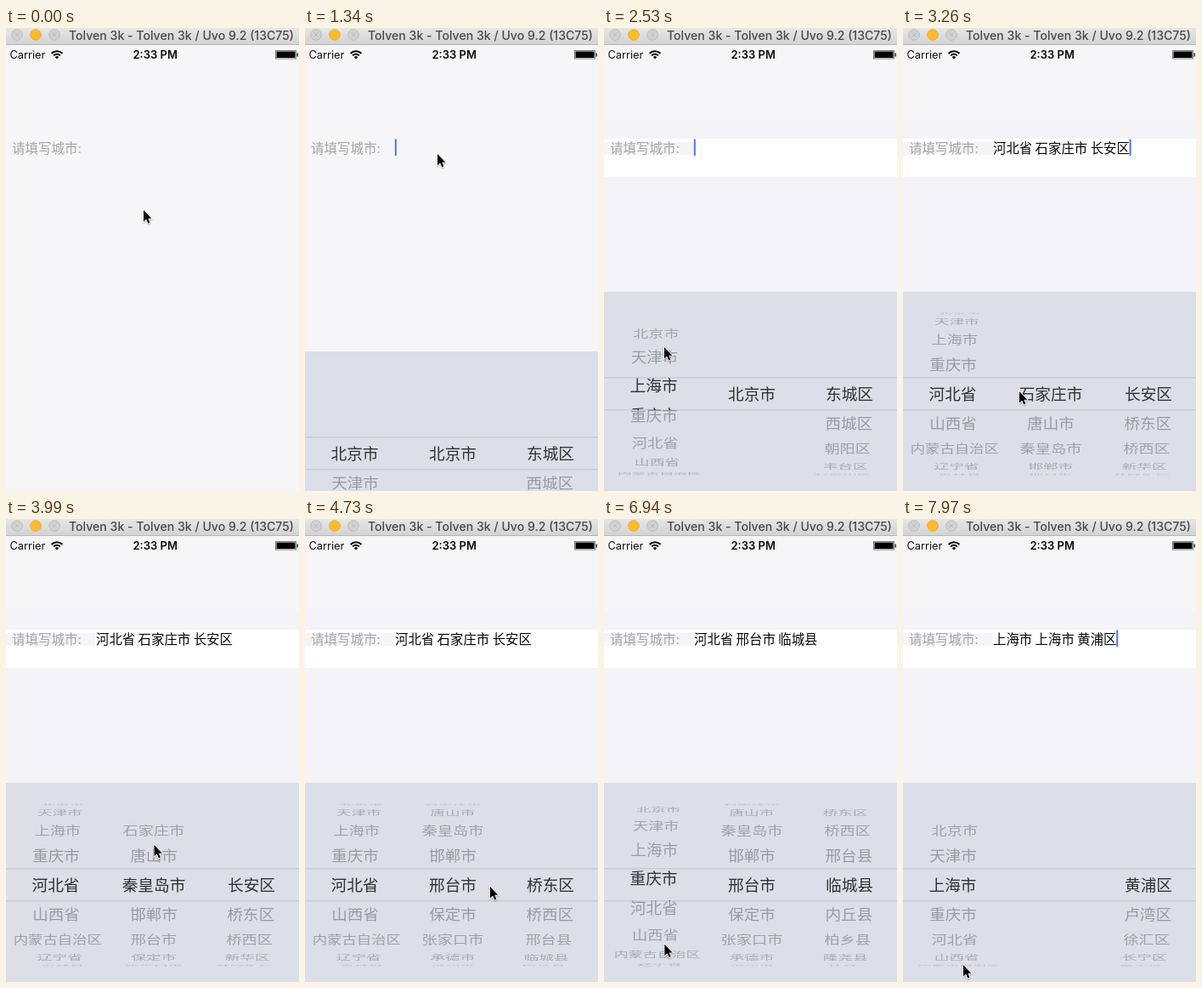
Write an HTML page with a canvas that moves like this. It is 345 by 544 pixels and loops after 8 s.

```html
<!DOCTYPE html>
<html lang="zh-CN">
<head>
<meta charset="utf-8">
<title>City picker</title>
<style>
  html, body { margin: 0; width: 100%; height: 100%; overflow: hidden; background: #f6f6f8; }
  canvas { display: block; width: 345px; height: 544px; }
</style>
</head>
<body>
<canvas id="stage"></canvas>
<script>
const W = 345, H = 544, LOOP = 8000, STEP = 147.59;
const CJK = '"Noto Sans CJK SC", "Noto Sans CJK", sans-serif';
const LATIN = 'Inter, Roboto, sans-serif';
const canvas = document.getElementById('stage');
const dpr = window.devicePixelRatio || 1;
canvas.width = W * dpr;
canvas.height = H * dpr;
const ctx = canvas.getContext('2d');

const list = s => s.split(' ');
const provinces = list('北京市 天津市 上海市 重庆市 河北省 山西省 内蒙古自治区 辽宁省 吉林省 黑龙江省 江苏省');
const hebei = list('石家庄市 唐山市 秦皇岛市 邯郸市 邢台市 保定市 张家口市 承德市 沧州市 廊坊市 衡水市');
const beijing = list('东城区 西城区 朝阳区 丰台区 石景山区 海淀区');
const shijiazhuang = list('长安区 桥东区 桥西区 新华区 井陉矿区 裕华区');
const xingtai = list('桥东区 桥西区 邢台县 临城县 内丘县 柏乡县 隆尧县 任县 南和县');
const shanghai = list('黄浦区 卢湾区 徐汇区 长宁区 静安区 普陀区');

// Lists and text jump, the rest eases.
const OPEN = 9, RESET = 51;
const lists = [[0, ['北京市'], beijing], [20, hebei, shijiazhuang], [30, hebei, xingtai], [RESET, [], shanghai]];
const edits = [[OPEN, ''], [21, '河北省 石家庄市 长安区'], [36, '河北省 邢台市 桥东区'],
  [43, '河北省 邢台市 临城县'], [53, '上海市 上海市 黄浦区']];
const latest = (track, n) => track.filter(k => k[0] <= n).pop();

function ease(n, from, to) {
  const p = Math.min(1, Math.max(0, (n - from) / (to - from)));
  return p * p * (3 - 2 * p);
}

// Pointer moves: start, end, x, y
const moves = [
  [0, 2, 190, 200], [2, 5, 156, 148],
  [9, 14, 72, 455], [14, 17, 71, 375],
  [18, 22, 137, 427], [22, 24, 172, 480], [24, 28, 175, 365],
  [29, 32, 218, 432], [32, 35, 285, 470], [35, 39, 285, 371],
  [40, 44, 72, 455], [44, 49, 71, 524]
];

function pointerAt(n) {
  let x = 162, y = 214;
  for (const [from, to, tx, ty] of moves) {
    const p = ease(n, from, to);
    x += (tx - x) * p;
    y += (ty - y) * p;
  }
  return [x, y];
}

function rect(color, x, y, w, h) {
  ctx.fillStyle = color;
  ctx.fillRect(x, y, w, h);
}

function text(str, x, y, font, color, align = 'left') {
  ctx.font = font;
  ctx.fillStyle = color;
  ctx.textAlign = align;
  ctx.fillText(str, x, y);
}

function button(x, fill, edge, crossed) {
  ctx.beginPath();
  ctx.arc(x, 8, 6.3, 0, 7);
  ctx.fillStyle = fill;
  ctx.fill();
  if (crossed) {
    for (const d of [-2.5, 2.5]) {
      ctx.moveTo(x - 2.5, 8 - d);
      ctx.lineTo(x + 2.5, 8 + d);
    }
  }
  ctx.strokeStyle = edge;
  ctx.lineWidth = 1;
  ctx.stroke();
}

function drawBars() {
  const bar = ctx.createLinearGradient(0, 0, 0, 19);
  bar.addColorStop(0, '#e6e6e6');
  bar.addColorStop(1, '#d3d3d3');
  rect(bar, 0, 0, W, 19);
  rect('#b7b7b7', 0, 19, W, 1);
  button(13, '#d2d2d2', '#bababa', true);
  button(35, '#fdbb2d', '#f0ae2b', false);
  button(57, '#d2d2d2', '#bababa', true);
  text('Tolven 3k - Tolven 3k / Uvo 9.2 (13C75)', 74, 13.5, '500 14.1px ' + LATIN, '#484848');

  text('Carrier', 4.5, 36, '12.8px ' + LATIN, '#111');
  text('2:33 PM', 175.7, 36, '600 13px ' + LATIN, '#0a0a0a', 'center');

  ctx.strokeStyle = ctx.fillStyle = '#0a0a0a';
  ctx.lineWidth = 2;
  for (const r of [5.3, 8.8]) {
    ctx.beginPath();
    ctx.arc(60, 36, r, -Math.PI * .76, -Math.PI * .24);
    ctx.stroke();
  }
  ctx.beginPath();
  ctx.moveTo(60, 36.5);
  ctx.arc(60, 36.5, 3.2, -Math.PI * .75, -Math.PI * .25);
  ctx.fill();

  ctx.lineWidth = 1;
  ctx.strokeStyle = '#808080';
  ctx.strokeRect(317.5, 26.5, 24, 9.5);
  rect('#000', 318.5, 27.5, 22, 7.5);
  rect('#333', 342.5, 29.5, 1.5, 4);
}

function drawField(n) {
  if (n > OPEN) {
    rect('#f3f3f8', 0, 108, W, 202);
    rect('#fff', 0, 130, W, 45);
    rect('#f5f5f8', 0, 134, 105, 15);
  }
  text('请填写城市:', 7, 147, '300 15.5px ' + CJK, '#a6a6a8');
  if (n < OPEN) return;
  const [since, value] = latest(edits, n);
  text(value, 106, 147, '15.4px ' + CJK, '#080808');
  const blinkOn = (n - since) % 7 < 4;
  if (blinkOn) rect('#4a78ea', 105.8 + ctx.measureText(value).width, 130.5, 2, 19.5);
}

// Rows sit on a cylinder seen from the front.
function drawWheel(rows, pos, cx, dark) {
  ctx.font = '18.7px ' + CJK;
  ctx.textAlign = 'center';
  rows.forEach((row, i) => {
    const angle = (i - pos) * .372;
    if (Math.abs(angle) > 1.53) return;
    const c = Math.cos(angle), far = 1 - c;
    const fit = Math.min(1, 107 / ctx.measureText(row).width);
    ctx.save();
    ctx.translate(172.5 + (cx - 172.5) * (1 - .075 * far), 430 + 95 * Math.sin(angle));
    ctx.scale((1 - .1 * far) * fit, c * fit);
    ctx.fillStyle = dark ? '#303238' : `rgba(16,18,24,${.2 + .14 * c})`;
    ctx.fillText(row, 0, 7);
    ctx.restore();
  });
}

function drawPicker(n) {
  const [, cities, areas] = latest(lists, n);
  const live = n < RESET ? 1 : 0;
  const wheels = [
    [provinces, 4 * ease(n, 14, 19.5) - 2 * ease(n, 44, RESET), 58.5],
    [cities, live * 4 * ease(n, 24, 30), 174],
    [areas, live * 3 * ease(n, 35, 39.7), 289]
  ];
  const pass = (dark, y, h) => {
    ctx.save();
    ctx.beginPath();
    ctx.rect(0, y, W, h);
    ctx.clip();
    for (const wheel of wheels) drawWheel(...wheel, dark);
    ctx.restore();
  };
  ctx.save();
  ctx.translate(0, Math.round(70 * .15 ** (n - OPEN)));
  rect('#dcdfe8', 0, 310, W, 234);
  rect('#c9ccd4', 0, 410, W, 1.5);
  rect('#c9ccd4', 0, 448, W, 1.5);
  pass(false, 310, 100.5);
  pass(true, 410.5, 38.5);
  pass(false, 449, 95);
  ctx.restore();
}

const arrow = new Path2D('M0 0V13.4L3.1 10.6L5.3 15.4L7.4 14.5L5.3 9.7H9.4Z');

function drawPointer(n) {
  ctx.save();
  ctx.translate(...pointerAt(n));
  ctx.shadowColor = 'rgba(0,0,0,.3)';
  ctx.shadowBlur = 2 * dpr;
  ctx.shadowOffsetY = dpr;
  ctx.lineWidth = 1.6;
  ctx.strokeStyle = '#fff';
  ctx.stroke(arrow);
  ctx.shadowColor = 'transparent';
  ctx.fillStyle = '#000';
  ctx.fill(arrow);
  ctx.restore();
}

function draw(ms) {
  const n = Math.floor(ms % LOOP / STEP);
  ctx.setTransform(dpr, 0, 0, dpr, 0, 0);
  rect('#f6f6f8', 0, 0, W, H);
  drawBars();
  drawField(n);
  if (n >= OPEN) drawPicker(n);
  drawPointer(n);
}

const start = performance.now();
function tick() {
  draw(performance.now() - start);
  requestAnimationFrame(tick);
}
tick();
</script>
</body>
</html>
```
